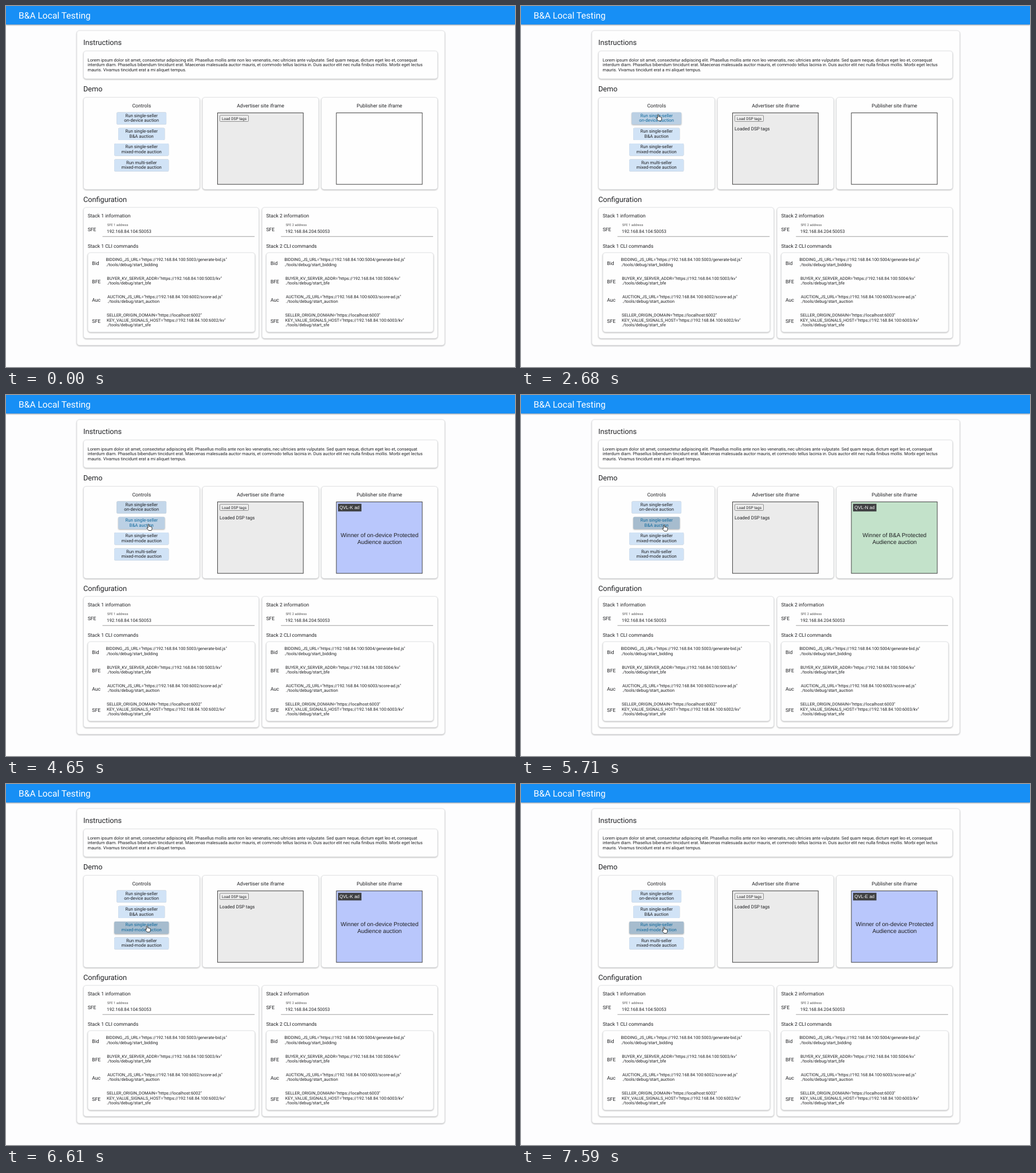
An HTML page for the animation above (8 s loop, 889 by 630 pixels).

```html
<!DOCTYPE html>
<html lang="en">
<head>
<meta charset="utf-8">
<title>B&amp;A Local Testing</title>
<style>
html, body { margin: 0; width: 100%; height: 100%; overflow: hidden; background: #fdfdfe; }
svg { display: block; width: 889px; height: 630px; }
text { font-family: Roboto, "Open Sans", sans-serif; fill: #202124; text-rendering: geometricPrecision; white-space: pre; }
text.ad { font-family: "Liberation Sans", Arial, sans-serif; }
.card { fill: #fefefe; stroke: #dfe0e2; stroke-width: .8; filter: drop-shadow(0 1px .8px rgba(0,0,0,.28)); }
.bar { fill: #178ff5; filter: drop-shadow(0 1px 1.2px rgba(0,0,0,.4)); }
</style>
</head>
<body>
<svg id="stage" viewBox="0 0 889 630"></svg>
<script>
const LOOP = 8000;
const stage = document.getElementById('stage');

function add(tag, attrs, parent = stage) {
  const el = document.createElementNS('http://www.w3.org/2000/svg', tag);
  for (const k in attrs) el.setAttribute(k, attrs[k]);
  parent.appendChild(el);
  return el;
}
function box(x1, y1, x2, y2, attrs, parent) {
  return add('rect', { x: x1, y: y1, width: x2 - x1, height: y2 - y1, ...attrs }, parent);
}
function label(str, x, y, size, attrs = {}, parent) {
  const el = add('text', { x, y, 'font-size': size, ...attrs }, parent);
  el.textContent = str;
  return el;
}
const mid = { 'text-anchor': 'middle' };
const card = (x1, y1, x2, y2) => box(x1, y1, x2, y2, { rx: 4.5, class: 'card' });

// Page frame
box(0, 0, 889, 32.3, { class: 'bar' });
label('B&A Local Testing', 22, 21.5, 15.6, { style: 'fill:#fff' });
card(123.8, 43, 766.2, 592);

// Instructions
label('Instructions', 135, 68, 12.7);
card(135.5, 78.5, 753.7, 127);
[
  'Lorem ipsum dolor sit amet, consectetur adipiscing elit. Phasellus mollis ante non leo venenatis, nec ultricies ante vulputate. Sed quam neque, dictum eget leo et, consequat',
  'interdum diam. Phasellus bibendum tincidunt erat. Maecenas malesuada auctor mauris, et commodo tellus lacinia in. Duis auctor elit nec nulla finibus mollis. Morbi eget lectus',
  'mauris. Vivamus tincidunt erat a mi aliquet tempus.'
].forEach((line, i) => label(line, 142.6, 96.6 + i * 8.75, 7.55));

// Demo cards
label('Demo', 135, 149, 12.7);
['Controls', 'Advertiser site iframe', 'Publisher site iframe'].forEach((title, i) => {
  const x = 135.5 + i * 207.7;
  card(x, 159.5, x + 202.8, 320);
  label(title, x + 101.3, 176.9, 8.7, mid);
});

const buttons = [
  ['Run single-seller', 'on-device auction', 43.4],
  ['Run single-seller', 'B&A auction', 40.6],
  ['Run single-seller', 'mixed-mode auction', 47.6],
  ['Run multi-seller', 'mixed-mode auction', 47.6]
].map(([a, b, half], i) => {
  const y = 185.4 + i * 27.35;
  const face = box(236.7 - half, y, 236.7 + half, y + 21.3, { rx: 2 });
  const lines = [a, b].map((s, n) => label(s, 236.7, y + 8.2 + n * 8.6, 7.75, mid));
  return { face, lines };
});

box(369.5, 186.5, 519.2, 311.2, { fill: '#ebebeb', stroke: '#444' });
const loadFace = box(373.5, 190.8, 423.5, 201.5, { rx: 1, fill: '#efefef', stroke: '#777', 'stroke-width': .8 });
label('Load DSP tags', 398.5, 198.5, 6.6, mid);
const loaded = label('Loaded DSP tags', 373, 216.6, 8.05);

const screen = box(577, 186.5, 727, 311.2, { fill: '#fefefe', stroke: '#444' });
const ad = add('g', {});
box(580, 189.8, 620.8, 203.2, { fill: '#404143' }, ad);
const adName = label('', 582.2, 199.3, 8, { class: 'ad', style: 'fill:#fff' }, ad);
const adLine = label('', 652.4, 247.6, 10.1, { class: 'ad', ...mid }, ad);
label('Audience auction', 652.4, 259.5, 10.1, { class: 'ad', ...mid }, ad);

// Configuration
label('Configuration', 135, 341.5, 12.7);
function stack(n, x) {
  const ip = '192.168.84.100';
  const kv = 5002 + n, js = 6001 + n;
  card(x, 351.6, x + (n === 1 ? 306 : 306.5), 580);
  label(`Stack ${n} information`, x + 7.2, 369.2, 8.6);
  label('SFE', x + 7.2, 393, 8.6);
  label(`SFE ${n} address`, x + 41.2, 384.1, 5.8, { style: 'fill:#555' });
  label(`192.168.84.${n}04:50053`, x + 40.6, 396, 7.75);
  box(x + 33, 401.8, x + 298.7, 402.6, { fill: '#8a8a8a' });
  label(`Stack ${n} CLI commands`, x + 7.2, 421.7, 8.6);
  card(x + 7.5, 430.6, x + 299.2, 569);
  [
    ['Bid', 451.5, 39, 445.1, `BIDDING_JS_URL="https://${ip}:${kv}/generate-bid.js"`, './tools/debug/start_bidding'],
    ['BFE', 483.6, 40.8, 477.5, `BUYER_KV_SERVER_ADDR="https://${ip}:${kv}/kv"`, './tools/debug/start_bfe'],
    ['Auc', 516, 41.5, 509.7, `AUCTION_JS_URL="https://${ip}:${js}/score-ad.js"`, './tools/debug/start_auction'],
    ['SFE', 552.7, 40.6, 541.8, `SELLER_ORIGIN_DOMAIN="https://localhost:${js}"`,
      `KEY_VALUE_SIGNALS_HOST="https://${ip}:${js}/kv"`, './tools/debug/start_sfe']
  ].forEach(([tag, y, dx, top, ...lines]) => {
    label(tag, x + 14.8, y, 8.6);
    lines.forEach((s, i) => label(s, x + dx, top + i * 8.75, 7.4));
  });
}
stack(1, 135.5);
stack(2, 447.2);

// Pointer shapes, both with the tip at 0,0
const pointer = add('g', {});
const arrow = add('path', {
  d: 'M0 0V8.2L1.9 6.5 3.2 9.5 4.7 8.8 3.4 5.9H6z',
  fill: '#111', stroke: '#fff', 'stroke-width': .6
}, pointer);
const hand = add('path', {
  d: 'M-1 .8q1-1.4 2 0V4q1.2-.6 1.8.3 1.1-.5 1.7.4 1.4-.3 1.5 1V8q-.2 2-1.2 3H.2Q-1.5 9-3.2 6.6q.3-1.3 2.2 0z',
  fill: '#fff', stroke: '#222', 'stroke-width': .9, 'stroke-linejoin': 'round'
}, pointer);

// Timeline: time, x, y of the pointer tip
const path = [
  [460, 893, 300], [950, 440, 222], [1140, 440, 222], [1360, 410.5, 199.2],
  [1460, 410.5, 199.2], [1730, 406, 197.5], [2450, 406, 197.5], [2680, 239.6, 189.3],
  [2780, 239.6, 189.3], [2890, 235.8, 191.5], [3970, 235.8, 191.5], [4230, 249, 225.5],
  [4650, 249, 225.5], [4710, 250, 226.6], [5730, 250, 226.6], [6010, 246.3, 247.3],
  [6740, 246.3, 247.3], [7030, 249.6, 249.4]
];
const hover = [[2560, 4060], [4090, 5840], [5880, 9000]];
const focus = [[3140, 4860], [4860, 6250], [6250, 9000]];
const OWN = 'Winner of on-device Protected';
const shows = [
  [3940, 'QVL-K ad', OWN, '#b9c7fc'],
  [5710, 'QVL-N ad', 'Winner of B&A Protected', '#c3e2ca'],
  [6480, 'QVL-K ad', OWN, '#b9c7fc'],
  [7590, 'QVL-E ad', OWN, '#b9c7fc']
];

const clamp = v => Math.max(0, Math.min(1, v));
const ease = v => v * v * (3 - 2 * v);
const fade = (t, span) => span ? clamp((t - span[0]) / 110) * clamp(1 - (t - span[1]) / 110) : 0;
const mix = (a, b, k) => a.map((v, i) => v + (b[i] - v) * k);
const rgb = c => `rgb(${c.map(Math.round)})`;

function tipAt(t) {
  const i = path.findIndex(p => p[0] > t);
  if (i === 0) return path[0].slice(1);
  if (i < 0) return path[path.length - 1].slice(1);
  const [t0, ...a] = path[i - 1], [t1, ...b] = path[i];
  return mix(a, b, ease((t - t0) / (t1 - t0)));
}

function draw(t) {
  buttons.forEach(({ face, lines }, i) => {
    const h = fade(t, hover[i]), f = fade(t, focus[i]);
    face.setAttribute('fill', rgb(mix(mix([209, 227, 246], [187, 208, 228], h), [166, 188, 206], f * (.3 + .7 * h))));
    face.style.filter = `drop-shadow(0 ${.7 + .6 * h}px ${.7 + .6 * h}px rgba(0,0,0,.32))`;
    lines.forEach(el => el.style.fill = rgb(mix([32, 33, 36], [16, 105, 156], h)));
  });

  loadFace.setAttribute('fill', t >= 1340 && t < 2490 ? '#e5e5e5' : '#efefef');
  loaded.setAttribute('visibility', t >= 2160 ? 'visible' : 'hidden');

  const show = shows.filter(s => s[0] <= t).pop();
  ad.setAttribute('visibility', show ? 'visible' : 'hidden');
  screen.setAttribute('fill', show ? show[3] : '#fefefe');
  if (show) {
    adName.textContent = show[1];
    adLine.textContent = show[2];
  }

  const [x, y] = tipAt(t);
  const onButton = hover.some(([a, b]) => t >= a && t < b);
  pointer.setAttribute('transform', `translate(${x} ${y})`);
  pointer.setAttribute('visibility', t >= 460 ? 'visible' : 'hidden');
  arrow.setAttribute('display', onButton ? 'none' : 'inline');
  hand.setAttribute('display', onButton ? 'inline' : 'none');
}

const start = performance.now();
function tick() {
  draw((performance.now() - start) % LOOP);
  requestAnimationFrame(tick);
}
tick();
</script>
</body>
</html>
```
